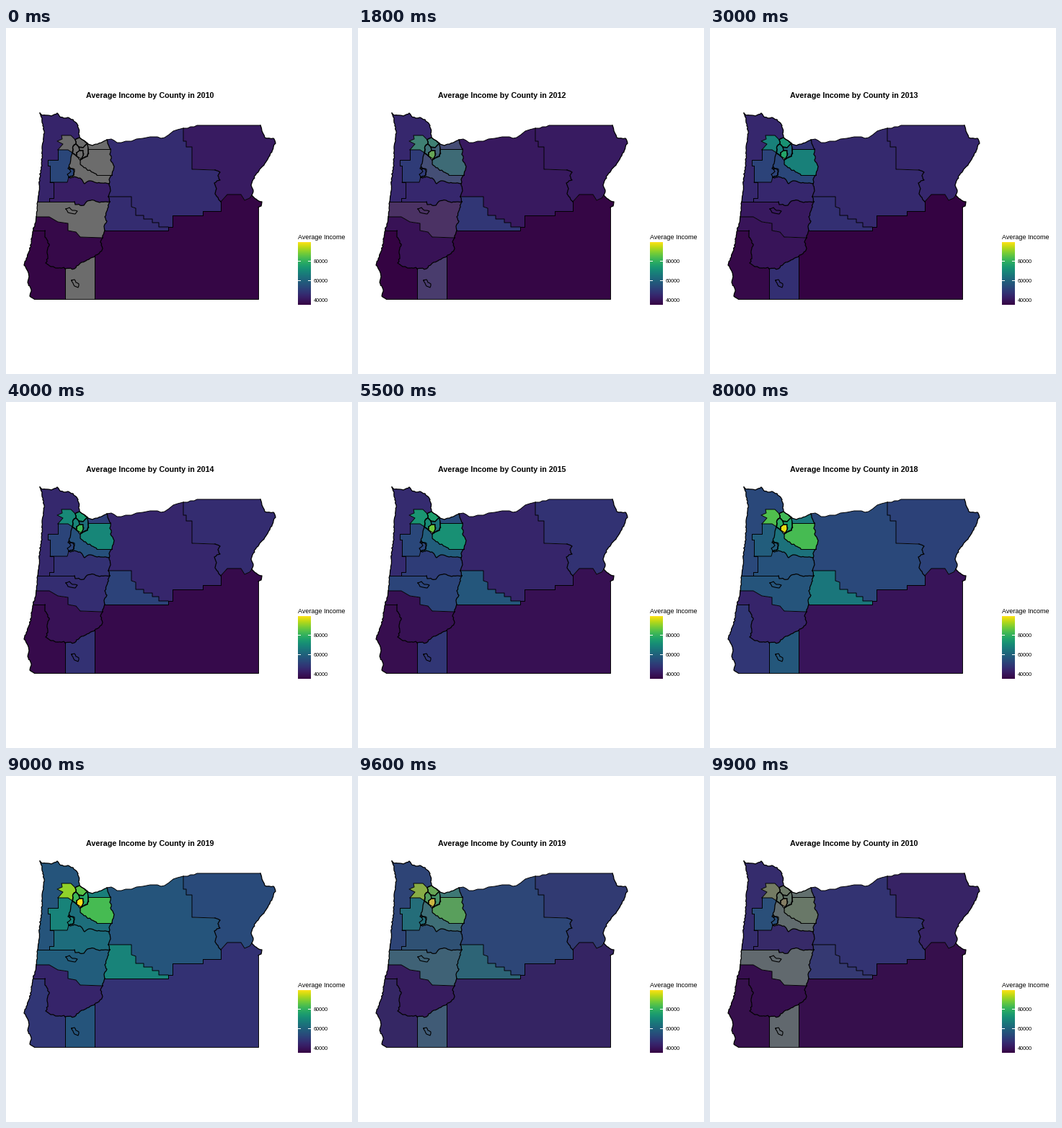
A matplotlib script that plays this animation: 480 by 480 pixels, repeating every 10000 ms.

```python
import matplotlib.pyplot as plt
import numpy as np
from matplotlib.animation import FuncAnimation
from matplotlib.patches import Polygon, Rectangle

SIZE, DPI = 480, 80
PX = 72 / DPI  # points per pixel
FRAMES, STEP_MS = 100, 100
LOW, HIGH = 34800, 99500
plt.rcParams["font.family"] = "Liberation Sans"
rng = np.random.default_rng(7)

# Borders shared by neighbouring areas, in pixels from the top left.
ROUGH = {
    "coast_n": [(44, 241), (46, 226), (47, 212), (49, 196), (50, 178), (50, 165),
                (52, 152), (53, 143), (50, 131), (50, 125), (47, 118)],
    "coast_mid": [(42, 262), (44, 241)],
    "coast_dg": [(38, 281), (41, 270), (42, 262)],
    "coast_s": [(39, 376), (33, 372), (35, 363), (31, 355), (32, 345), (30, 337),
                (25, 329), (28, 320), (33, 308), (35, 297), (38, 281)],
    "river_w": [(47, 118), (50, 121), (57, 121), (63, 122), (71, 118), (74, 122),
                (80, 125), (86, 124), (93, 127), (98, 132), (101, 140), (102, 152)],
    "river_city": [(102, 152), (106, 155), (113, 160)],
    "river_gorge": [(113, 160), (120, 163), (127, 161), (134, 158), (140, 155)],
    "gorge_e": [(140, 155), (142, 162), (145, 168)],
    "ridge_1": [(145, 168), (146, 178), (145, 183), (150, 192), (147, 204)],
    "ridge_2": [(147, 204), (143, 210), (143, 216)],
    "ridge_3": [(143, 216), (145, 226), (142, 234)],
    "ridge_4": [(142, 234), (144, 241)],
    "ridge_5": [(144, 241), (141, 250), (137, 262), (140, 268), (136, 275), (137, 281)],
    "ridge_6": [(137, 281), (134, 291)],
    "ridge_7": [(134, 291), (131, 297), (134, 306), (129, 313), (123, 317)],
    "valley_w": [(87, 207), (94, 204), (93, 196), (86, 195), (89, 188), (90, 180), (92, 173)],
    "valley_s": [(87, 207), (98, 207), (105, 210), (109, 216), (115, 212), (123, 214),
                 (131, 215), (143, 216)],
    "valley_n": [(103, 183), (103, 189), (112, 196), (126, 204)],
    "band_s": [(95, 241), (96, 245), (108, 246), (113, 240), (122, 239), (130, 242), (144, 241)],
    "south_w": [(54, 281), (54, 290), (60, 300), (57, 312), (58, 320), (55, 326),
                (62, 331), (72, 333), (82, 334)],
    "south_e": [(82, 334), (95, 334), (105, 325), (115, 321), (123, 317)],
    "east_rough": [(290, 197), (297, 200), (294, 205), (297, 211), (289, 215), (292, 223),
                   (290, 230), (295, 238), (298, 241)],
    "snake_n": [(353, 135), (356, 145), (359, 152), (366, 153), (371, 153), (374, 160),
                (371, 165), (366, 177), (359, 188), (351, 198), (343, 210), (340, 218),
                (343, 225), (341, 232)],
    "snake_s": [(341, 232), (349, 239), (355, 241), (354, 247), (350, 249)],
    "city_w": [(92, 173), (93, 164), (97, 161), (96, 155)],
    "city_s": [(92, 173), (98, 178), (103, 183)],
    "city_e": [(103, 183), (113, 178), (114, 168)],
}
SMOOTH = {
    "river_e": [(140, 155), (146, 154), (150, 156), (154, 159), (160, 159), (166, 157),
                (174, 157), (181, 154), (190, 153), (200, 151), (210, 151), (215, 153),
                (220, 152), (226, 148), (232, 143), (238, 141), (246, 139)],
    "river_ne": [(246, 139), (252, 139), (256, 137), (261, 137), (265, 135), (353, 135)],
    "nw_gap": [(102, 152), (96, 155)],
    "suburb_n": [(96, 155), (90, 149), (77, 149), (78, 154), (71, 157), (79, 161), (72, 169)],
    "suburb_s": [(72, 169), (86, 169), (92, 173)],
    "west_n": [(72, 169), (72, 183), (58, 183), (58, 191), (61, 191), (61, 214)],
    "west_mid": [(61, 214), (66, 214), (66, 236), (60, 236), (60, 241)],
    "west_s": [(60, 241), (44, 241)],
    "band_n": [(61, 214), (85, 214), (87, 207)],
    "band_sw": [(60, 241), (95, 241)],
    "hills_s": [(126, 204), (147, 204)],
    "gorge_s": [(114, 168), (145, 168)],
    "gorge_w": [(113, 160), (114, 168)],
    "mid_s": [(42, 262), (60, 262), (72, 269), (86, 271), (86, 281), (97, 283),
              (103, 290), (134, 291)],
    "south_n": [(38, 281), (54, 281)],
    "south_x": [(82, 334), (82, 376)],
    "south_xe": [(123, 317), (123, 376)],
    "base_w": [(82, 376), (39, 376)],
    "base_mid": [(123, 376), (82, 376)],
    "base_e": [(350, 249), (350, 376), (123, 376)],
    "stair": [(142, 234), (174, 234), (174, 248), (180, 250), (180, 260), (191, 260),
              (191, 265), (203, 265), (203, 270), (212, 270), (212, 276), (225, 276)],
    "stair_s": [(225, 276), (225, 281), (137, 281)],
    "plain_s": [(298, 241), (298, 254), (273, 254), (273, 260), (231, 260), (231, 276), (225, 276)],
    "east_line": [(246, 139), (246, 157), (250, 157), (250, 165), (258, 165), (258, 196),
                  (290, 197)],
    "east_s": [(298, 241), (307, 231), (326, 231), (331, 239), (338, 236), (341, 232)],
}
# Small towns drawn as closed rings.
RINGS = [
    [(83, 251), (88, 249), (92, 253), (99, 254), (96, 258), (90, 257), (86, 256)],
    [(91, 350), (95, 349), (97, 353), (101, 355), (100, 360), (95, 358), (93, 354)],
    [(88, 193), (95, 196), (94, 204), (87, 207), (85, 203), (90, 199)],
]
# City districts: ring of corners.
DISTRICTS = {
    "north": [(102, 152), (106, 155), (113, 160), (107, 166), (101, 165), (97, 161), (96, 155)],
    "west": [(97, 161), (101, 165), (102, 170), (98, 173), (98, 178), (92, 173), (93, 164)],
    "lake": [(98, 173), (102, 170), (107, 170), (107, 177), (104, 182), (98, 178)],
    "east": [(101, 165), (107, 166), (113, 160), (114, 168), (113, 178), (104, 182),
             (107, 177), (107, 170), (102, 170)],
}
# Areas as chains of borders; a minus sign runs a border backwards.
AREAS = {
    "nw": "coast_n river_w nw_gap suburb_n west_n west_mid west_s",
    "suburb": "suburb_n suburb_s city_w",
    "vine": "west_n band_n valley_w -suburb_s",
    "band": "-band_n west_mid band_sw band_s -ridge_4 -ridge_3 -valley_s",
    "valley": "valley_w city_s valley_n hills_s ridge_2 -valley_s",
    "hills": "valley_n hills_s -ridge_1 -gorge_s -city_e",
    "gorge": "river_gorge gorge_e -gorge_s -gorge_w",
    "mid": "coast_mid -west_s band_sw band_s ridge_5 ridge_6 -mid_s",
    "timber": "coast_dg mid_s ridge_7 -south_e -south_w -south_n",
    "sw": "coast_s south_n south_w south_x base_w",
    "south": "south_e south_xe base_mid -south_x",
    "bend": "stair stair_s -ridge_5 -ridge_4",
    "plain": "river_e east_line east_rough plain_s -stair -ridge_3 -ridge_2 -ridge_1 -gorge_e",
    "ne": "river_ne snake_n -east_s -east_rough -east_line",
    "se": "east_s snake_s base_e -south_xe -ridge_7 -ridge_6 -stair_s -plain_s",
}
# Income as a share of the scale in these years; None where data is missing.
KEY_YEARS = [2010, 2012, 2013, 2015, 2018, 2019]
SHARES = {
    "nw": [.14, .15, .15, .16, .28, .33],
    "suburb": [None, .55, .51, .58, .76, .86],
    "vine": [.27, .23, .26, .27, .37, .52],
    "band": [.11, .15, .15, .23, .32, .43],
    "valley": [None, .25, .27, .36, .45, .44],
    "hills": [None, .42, .51, .56, .74, .74],
    "gorge": [None, .24, .20, .28, .47, .50],
    "mid": [None, .09, .09, .26, .33, .37],
    "timber": [.02, .06, .07, .05, .14, .14],
    "sw": [.01, .00, .02, .03, .21, .21],
    "south": [None, .15, .18, .20, .34, .33],
    "bend": [.17, .21, .18, .33, .47, .52],
    "plain": [.17, .09, .16, .13, .28, .33],
    "ne": [.10, .10, .15, .19, .25, .29],
    "se": [.01, .01, .00, .05, .07, .19],
    "north": [None, .55, .58, .62, .73, .78],
    "west": [None, .45, .50, .55, .68, .72],
    "lake": [None, .78, .65, .80, .97, 1.0],
    "east": [None, .35, .42, .45, .62, .66],
}

TO_XYZ = np.array([[.4124, .3576, .1805], [.2126, .7152, .0722], [.0193, .1192, .9505]])
WHITE = TO_XYZ.sum(axis=1)


def linear(rgb):
    rgb = np.asarray(rgb, float)
    return np.where(rgb <= .04045, rgb / 12.92, ((rgb + .055) / 1.055) ** 2.4)


def to_lab(rgb):
    f = np.cbrt(linear(rgb) @ TO_XYZ.T / WHITE)
    x, y, z = np.moveaxis(f, -1, 0)
    return np.stack([116 * y - 16, 500 * (x - y), 200 * (y - z)], axis=-1)


def shade(light):
    """Linear light to the darker 1.8 gamma used on screen."""
    return np.clip(light, 0, 1) ** (1 / 1.8)


def from_lab(lab):
    y = (lab[..., 0] + 16) / 116
    f = np.stack([y + lab[..., 1] / 500, y, y - lab[..., 2] / 200], axis=-1)
    return shade(f ** 3 * WHITE @ np.linalg.inv(TO_XYZ).T)


def roughen(points, amount=.55):
    """Break a line into short jittered pieces, keeping its corners."""
    path = [points[0]]
    for a, b in zip(points, points[1:]):
        a, b = np.array(a, float), np.array(b, float)
        parts = max(1, int(np.hypot(*(b - a)) / 2.2))
        for i in range(1, parts):
            path.append(a + (b - a) * i / parts + rng.normal(0, amount, 2))
        path.append(b)
    return np.array(path, float)


def yearly(shares):
    """One Lab colour per year from 2010 to 2019."""
    known = [(y, s) for y, s in zip(KEY_YEARS, shares) if s is not None]
    values = np.interp(np.arange(2010, 2020), *zip(*known))
    values[1] = values[2]
    colors = plt.cm.viridis(values)[:, :3]
    if shares[0] is None:
        colors[:2] = 127 / 255
    return to_lab(colors)


borders = {name: roughen(pts) for name, pts in ROUGH.items()}
borders.update({name: np.array(pts, float) for name, pts in SMOOTH.items()})


def ring(chain):
    """Join borders end to end, turning each one to fit the last."""
    lines = [borders[name.lstrip("-")] for name in chain.split()]
    first, second = lines[0], lines[1]
    ends = (second[0], second[-1])
    if not any(np.allclose(first[-1], e) for e in ends):
        first = first[::-1]
    path = list(first)
    for line in lines[1:]:
        near = np.hypot(*(line[0] - path[-1])) <= np.hypot(*(line[-1] - path[-1]))
        path.extend(line if near else line[::-1])
    return path


fig = plt.figure(figsize=(SIZE / DPI, SIZE / DPI), dpi=DPI, facecolor="white")
ax = fig.add_axes([0, 0, 1, 1])
ax.set(xlim=(0, SIZE), ylim=(SIZE, 0))
ax.axis("off")

shapes = {name: ring(chain) for name, chain in AREAS.items()}
shapes.update(DISTRICTS)
areas = [ax.add_patch(Polygon(shapes[name], closed=True, lw=0)) for name in SHARES]
palette = np.stack([yearly(s) for s in SHARES.values()], axis=1)

for name, line in borders.items():
    width = 1.25 if name in ROUGH else .95
    ax.plot(*line.T, color="black", lw=width * PX, solid_joinstyle="round")
for corners in RINGS + list(DISTRICTS.values()):
    outline = roughen(corners + corners[:1], .4)
    ax.plot(*outline.T, color="black", lw=1.1 * PX)

title = ax.text(199.3, 97, "", ha="center", va="baseline", size=10.8 * PX, weight="bold")

# Colour bar.
BAR_X, BAR_W, BAR_TOP, BAR_H = 405, 17.5, 297.5, 86.5
ax.text(BAR_X, 293, "Average Income", va="baseline", size=9 * PX)
ramp = shade(linear(plt.cm.viridis(np.linspace(1, 0, 256))[:, :3]))
ax.imshow(ramp[:, None], extent=(BAR_X, BAR_X + BAR_W, BAR_TOP + BAR_H, BAR_TOP),
          aspect="auto", interpolation="bilinear")
ax.set(xlim=(0, SIZE), ylim=(SIZE, 0))
for value in (40000, 60000, 80000):
    y = BAR_TOP + BAR_H * (HIGH - value) / (HIGH - LOW)
    for x in (BAR_X, BAR_X + BAR_W * .8):
        ax.add_patch(Rectangle((x, y - .25), BAR_W / 5, .5, color="white", lw=0))
    ax.text(427, y + 2.7, str(value), va="baseline", size=7.2 * PX)


def draw(n):
    state, step = divmod(n, 10)
    hold, steps = (3, 7) if state == 0 else (4, 6)
    p = max(0, (step - hold) / steps)
    after = (state + 1) % 10
    colors = from_lab(palette[state] * (1 - p) + palette[after] * p)
    for area, color in zip(areas, colors):
        area.set_facecolor(color)
    year = 2010 + (after if p > .5 else state)
    title.set_text(f"Average Income by County in {year}")
    return areas + [title]


anim = FuncAnimation(fig, draw, frames=FRAMES, interval=STEP_MS, repeat=True, repeat_delay=0)
plt.show()
```
